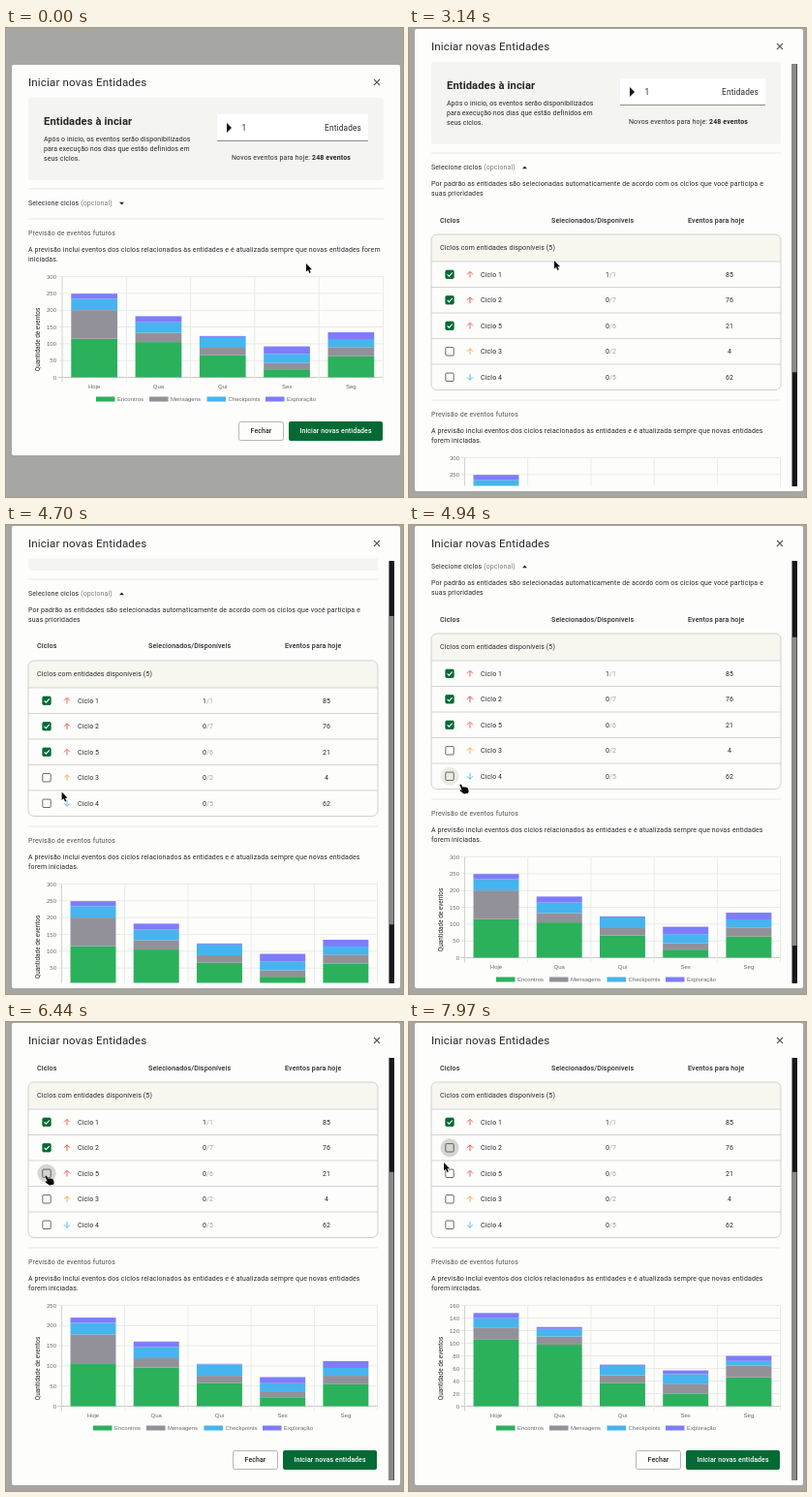
These frames come from a looping animation (410x484 px, 8 s). An HTML page with a canvas:

```html
<!DOCTYPE html>
<html lang="pt-BR">
<head>
<meta charset="utf-8">
<title>Iniciar novas Entidades</title>
<style>
html, body { margin: 0; width: 100%; height: 100%; overflow: hidden; background: #a6a6a2; }
canvas { display: block; width: 410px; height: 484px; }
</style>
</head>
<body>
<canvas id="stage"></canvas>
<script>
const LOOP = 8000, W = 410, H = 484, LEFT = 23;
const INK = '#26262a', SOFT = '#68686a', PAPER = '#fdfdfb', TINT = '#f4f4f0', LINE = '#e8e8e4', GREEN = '#046a34';
const OPEN_AT = 1945, EXTRA = 224;

const canvas = document.getElementById('stage');
const ctx = canvas.getContext('2d');
const dpr = window.devicePixelRatio || 1;
canvas.width = W * dpr;
canvas.height = H * dpr;

const days = ['Hoje', 'Qua', 'Qui', 'Sex', 'Seg'];
const series = [['Encontros', '#2bb05c', 93], ['Mensagens', '#92919a', 148],
  ['Checkpoints', '#46b4ee', 207.5], ['Exploração', '#7e7cfa', 268]];
// Cumulative bar tops per day, with the axis maximum and tick step
const charts = [
  { at: -2000, max: 300, step: 50, tops: [[115, 200, 234, 249], [105, 133, 164, 182], [66, 88, 120, 123], [24, 43, 70, 92], [63, 90, 114, 134]] },
  { at: 6250, max: 250, step: 50, tops: [[111, 187, 216, 229], [102, 125, 154, 167], [60, 77, 106, 107], [24, 38, 56, 69], [56, 76, 95, 112]] },
  { at: 7300, max: 160, step: 20, tops: [[106, 125, 140, 148], [98, 111, 123, 126], [37, 49, 64, 66], [20, 35, 51, 57], [46, 65, 72, 80]] }
];
// Number, chosen, available, events, arrow colour, time when unticked
const cycles = [[1, 1, 1, 85, '#ee6a5c', 1e9], [2, 0, 7, 76, '#e8524a', 7300], [5, 0, 6, 21, '#ee6a5c', 6250],
  [3, 0, 2, 4, '#f0b050', 0], [4, 0, 5, 62, '#5cbcec', 0]];
const scrollKeys = [[3600, 0], [4330, 39], [4440, 39], [4930, 101], [5270, 101], [5460, 151]];
const cursorKeys = [[100, 310, 243], [900, 104, 183], [2400, 104, 183], [2970, 150, 240], [3140, 150, 240],
  [3370, 140, 286], [3600, 140, 286], [4300, 63, 287], [4440, 63, 287], [4900, 54, 268], [5000, 54, 268],
  [5450, 42, 159], [6900, 42, 159], [7070, 35, 141], [7240, 42, 131], [7500, 42, 131], [7900, 36, 145]];

const clamp = v => Math.max(0, Math.min(1, v));
const mix = (a, b, p) => a + (b - a) * p;
const smooth = p => p * p * (3 - 2 * p);

function keyed(keys, t) {
  const i = keys.findIndex(k => k[0] > t);
  if (i < 0) return keys[keys.length - 1].slice(1);
  if (!i) return keys[0].slice(1);
  const [a, b] = [keys[i - 1], keys[i]];
  const p = smooth((t - a[0]) / (b[0] - a[0]));
  return a.slice(1).map((v, n) => mix(v, b[n + 1], p));
}

function text(str, x, y, { size = 6.96, weight = 400, color = INK, align = 'left', gap = 0.145, font = 'Roboto' } = {}) {
  ctx.font = `${weight} ${size}px ${font}, sans-serif`;
  ctx.letterSpacing = gap + 'px';
  ctx.textAlign = align;
  ctx.fillStyle = color;
  ctx.fillText(str, x, y + size * 0.355);
  return x + ctx.measureText(str).width;
}

function rect(x, y, w, h, color) {
  ctx.fillStyle = color;
  ctx.fillRect(x, y, w, h);
}

function round(x, y, w, h, r, fill, stroke) {
  ctx.beginPath();
  ctx.roundRect(x, y, w, h, r);
  if (fill) { ctx.fillStyle = fill; ctx.fill(); }
  if (stroke) { ctx.strokeStyle = stroke; ctx.lineWidth = 0.8; ctx.stroke(); }
}

function poly(points, fill) {
  ctx.beginPath();
  points.forEach(([x, y]) => ctx.lineTo(x, y));
  ctx.closePath();
  ctx.fillStyle = fill;
  ctx.fill();
}

function stroke(d, color, width) {
  ctx.strokeStyle = color;
  ctx.lineWidth = width;
  ctx.stroke(new Path2D(d));
}

function clipped(x, y, w, h, paint) {
  ctx.save();
  ctx.beginPath();
  ctx.rect(x, y, w, h);
  ctx.clip();
  paint();
  ctx.restore();
}

function drawPanel(c, right) {
  round(LEFT, c - 109, right - LEFT, 85, 3, TINT);
  text('Entidades à inciar', 39, c - 85, { size: 11.2, weight: 700, gap: 0.1 });
  ['Após o início, os eventos serão disponibilizados', 'para execução nos dias que estão definidos em', 'seus ciclos.']
    .forEach((s, i) => text(s, 39, c - 66 + i * 10, { size: 6.96, gap: 0.08 }));
  const end = right - 16;
  rect(218, c - 92, end - 218, 27, '#ffffff');
  rect(218, c - 65, end - 218, 0.9, '#808080');
  poly([[228, c - 83], [233, c - 78], [228, c - 73]], '#161618');
  text('1', 243.5, c - 78, { size: 8.3 });
  text('Entidades', end - 7, c - 78, { size: 8.3, align: 'right' });
  const x = text('Novos eventos para hoje: ', 233 - (390 - right), c - 47);
  text('248 eventos', x, c - 47, { weight: 700 });
  rect(LEFT, c - 15.5, right - LEFT, 1, LINE);
}

function drawRow(row, y, t, ring) {
  const [n, chosen, total, events, color, offAt] = row;
  if (ring) {
    ctx.beginPath();
    ctx.arc(42, y, 9.5, 0, 7);
    ctx.fillStyle = ring;
    ctx.fill();
  }
  const on = t < offAt;
  round(37.8, y - 4.2, 8.4, 8.4, 1, on ? GREEN : null, on ? GREEN : '#444448');
  if (on) stroke(`M39.6 ${y} l1.8 1.9 l3.4 -3.7`, '#fff', 1.1);
  const d = n === 4 ? -1 : 1;
  stroke(`M63 ${y + 3.2 * d} v${-6 * d} M60 ${y} l3 ${-3 * d} l3 ${3 * d}`, color, 1);
  text('Ciclo ' + n, 74, y);
  const x = text(String(chosen), 203, y);
  text('/' + total, x, y, { color: '#a2a2a0' });
  text(String(events), 331, y, { align: 'center' });
}

function ringFor(n, t) {
  if (n === 4 && t > 4850 && t < 5100) return '#ecece4';
  if (n === 5 && t > 5420 && t < 7220) return t < 6250 ? '#e4ecdc' : '#d6d6d0';
  if (n === 2 && t >= 7220) return t < 7300 ? '#ecece4' : '#d6d6d0';
}

function drawTable(c, right, t) {
  text('Por padrão as entidades são selecionadas automaticamente de acordo com os ciclos que você participa e', LEFT, c + 17);
  text('suas prioridades', LEFT, c + 27);
  const head = { size: 7.05, weight: 500 };
  text('Ciclos', 32, c + 54, head);
  text('Selecionados/Disponíveis', 147, c + 54, head);
  text('Eventos para hoje', 288, c + 54, head);
  const w = right - LEFT;
  round(LEFT, c + 69, w, 28, [6, 6, 0, 0], '#f7f7f0');
  text('Ciclos com entidades disponíveis (5)', 32, c + 83);
  cycles.forEach((row, i) => {
    const y = c + 97 + i * 26.5;
    rect(LEFT, y - 0.4, w, 0.8, '#cacad0');
    drawRow(row, y + 13.3, t, ringFor(row[0], t));
  });
  round(LEFT, c + 69, w, 160.5, 6, null, '#c4c4c6');
}

function drawChart(top, right, t) {
  const i = charts.findLastIndex(s => t >= s.at), now = charts[i], old = charts[Math.max(0, i - 1)];
  const p = 1 - Math.pow(1 - clamp((t - now.at) / 1000), 4);
  const shift = (390 - right) / 2;
  const x0 = 58 - shift / 5, w = (right - 0.5 - x0) / 5, high = 104, base = top + high;
  const small = { size: 6, gap: 0, color: SOFT, font: 'Liberation Sans' };

  for (let v = 0; v <= now.max; v += now.step) {
    const y = base - v / now.max * high;
    rect(x0 - 4, y - 0.4, 5 * w + 4, 0.9, v ? LINE : '#c4c4c2');
    text(String(v), 52, y, { ...small, align: 'right' });
  }
  for (let n = 0; n <= 5; n++) rect(x0 + n * w - 0.4, top, 0.9, high + 5, n ? LINE : '#cececc');

  days.forEach((day, d) => {
    const mid = x0 + (d + 0.5) * w;
    let low = 0;
    series.forEach(([, color], s) => {
      const level = mix(old.tops[d][s] / old.max, now.tops[d][s] / now.max, p);
      rect(mid - w * 0.36, base - level * high, w * 0.72, (level - low) * high, color);
      low = level;
    });
    text(day, mid, base + 9, { ...small, align: 'center' });
  });
  series.forEach(([name, color, x]) => {
    rect(x - shift, top + 124, 19.5, 5, color);
    text(name, x + 22 - shift, top + 126.5, small);
  });

  ctx.save();
  ctx.translate(32.5, top + 65);
  ctx.rotate(-Math.PI / 2);
  text('Quantidade de eventos', 0, 0, { size: 6.45, gap: 0, align: 'center' });
  ctx.restore();
}

function drawForecast(y, right, t) {
  const narrow = right < 387;
  rect(LEFT, y - 15.5, right - LEFT, 1, LINE);
  text('Previsão de eventos futuros', LEFT, y, { color: '#505052' });
  const line = 'A previsão inclui eventos dos ciclos relacionados às entidades e é atualizada sempre que novas entidades';
  text(line + (narrow ? '' : ' forem'), LEFT, y + 17);
  text((narrow ? 'forem ' : '') + 'iniciadas.', LEFT, y + 27);
  drawChart(y + 44.5, right, t);
  const b = y + 204, label = { weight: 500, align: 'center', gap: 0.1 };
  round(right - 149.5, b - 9.5, 46, 19, 2, PAPER, '#a4a4a4');
  text('Fechar', right - 126.5, b, label);
  round(right - 98, b - 10, 97, 20, 2, GREEN);
  text('Iniciar novas entidades', right - 49.5, b, { ...label, color: '#fff' });
}

function drawCursor(x, y, hand) {
  ctx.save();
  ctx.translate(x, y);
  ctx.scale(0.88, 0.88);
  const shape = new Path2D(hand
    ? 'M-2 0 q1.5 -1.4 2.3 .4 l1.4 2.8 q1 -1.2 2 -.1 q1.2 -1 2 .3 q1.3 -.7 1.9 .7 l1 2.6 q.3 1.8 -.8 3.2 l-4.4 1 l-4.5 -3.2 q-1.3 -1.6 .7 -1.6 l1.2 .4 z'
    : 'M0 0 V9.6 L2.2 7.6 L3.9 11.3 L5.5 10.6 L3.9 7 H6.9 Z');
  ctx.lineWidth = 1;
  ctx.strokeStyle = '#fff';
  ctx.stroke(shape);
  ctx.fillStyle = '#0a0a0a';
  ctx.fill(shape);
  ctx.restore();
}

function draw(t) {
  ctx.setTransform(dpr, 0, 0, dpr, 0, 0);
  rect(0, 0, W, H, '#a6a6a2');
  const e = smooth(clamp((t - OPEN_AT) / 225));
  const full = 403 + EXTRA * e, height = Math.min(full, 477), top = 239.5 - height / 2;
  const bars = full > 477;
  const right = bars ? 384 : 390;
  const [scroll] = keyed(scrollKeys, t);
  const c = top + 143 - scroll;

  round(6, top, 401, height, 2, PAPER);
  text('Iniciar novas Entidades', LEFT, top + 18, { size: 11.6 });
  stroke(`M380 ${top + 15} l6 6 m0 -6 l-6 6`, '#58585a', 1.1);

  clipped(6, top + 33.5, 401, height - 39, () => {
    drawPanel(c, right);
    const x = text('Selecione ciclos ', LEFT, c);
    text('(opcional)', x, c, { color: '#7a7a7a' });
    const d = e > 0.5 ? -1 : 1;
    poly([[117, c - 1.2 * d], [122, c - 1.2 * d], [119.5, c + 1.4 * d]], INK);
    if (e > 0) clipped(6, c + 4, 390, 230 * e, () => drawTable(c, right, t));
    drawForecast(c + 31 + EXTRA * e, right, t);
  });

  if (bars) {
    const view = 436;
    rect(395.5, top + 36, 5.5, view, '#18181c');
    rect(396, top + 36 + scroll * 0.78, 4.5, view * 0.73, '#8a8a86');
  }

  const [cx, cy] = keyed(cursorKeys, t);
  const hand = (t > 4850 && t < 5050) || (t > 5420 && t < 7700);
  drawCursor(cx, cy, hand);
}

function loop() {
  draw(performance.now() % LOOP);
  requestAnimationFrame(loop);
}
loop();
</script>
</body>
</html>
```
